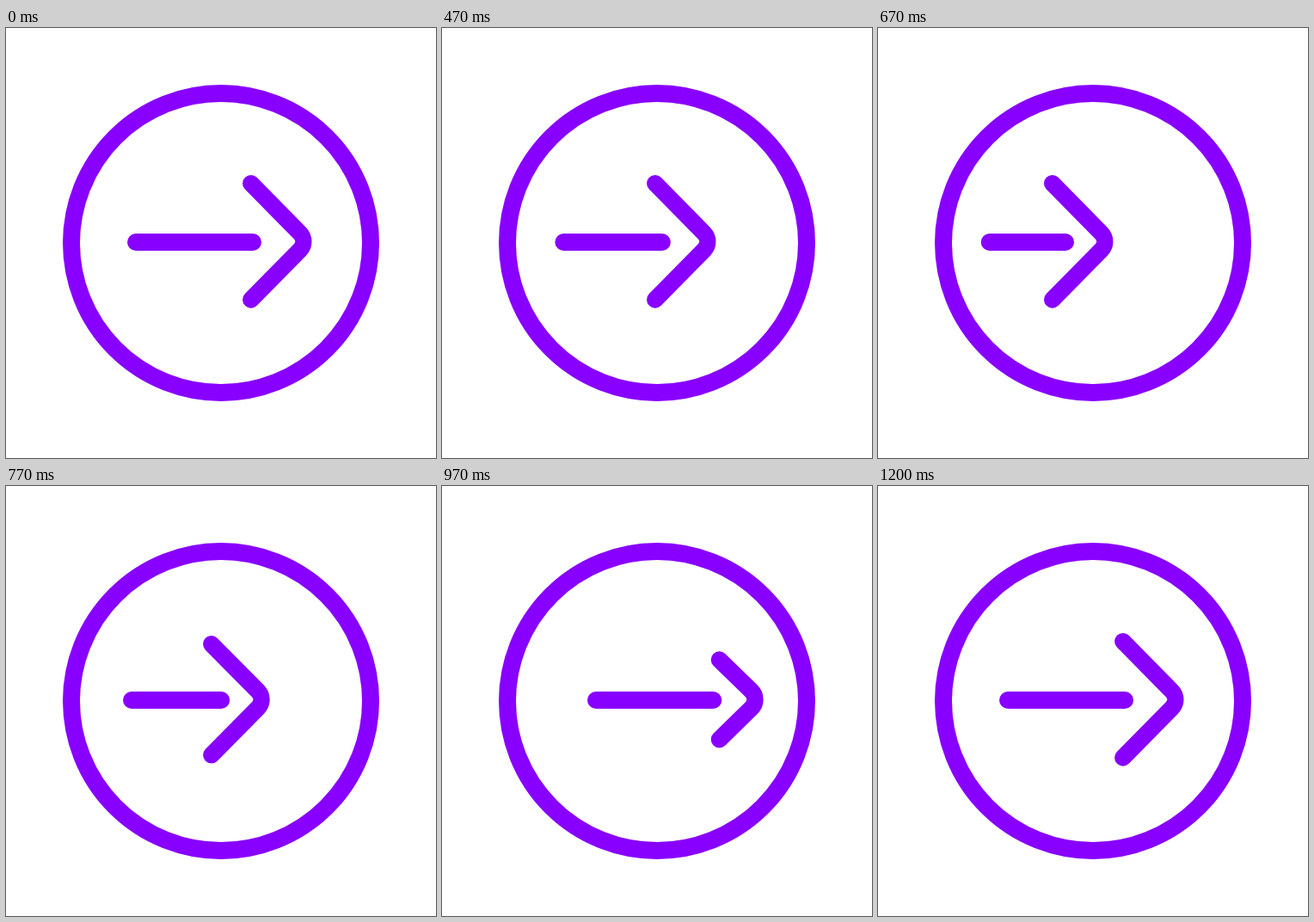
These frames come from a looping animation (500x500 px, 1230 ms). An HTML page with a canvas:

```html
<!DOCTYPE html>
<html lang="en">
<head>
<meta charset="utf-8">
<title>Arrow in a circle</title>
<style>
  html, body { margin: 0; width: 100%; height: 100%; overflow: hidden; background: #fff; }
  canvas { display: block; width: 500px; height: 500px; }
</style>
</head>
<body>
<canvas id="stage" width="500" height="500"></canvas>
<script>
const ctx = document.getElementById('stage').getContext('2d');
const COLOR = '#8800ff';
const LOOP = 1230;
const TICK = 100 / 3;
const LAST = 36;

// Cubic easing with flat ends; x1 and x2 set how long it lingers at each end.
function ease(t, x1, x2) {
  if (t <= 0) return 0;
  if (t >= 1) return 1;
  let lo = 0, hi = 1;
  for (let i = 0; i < 30; i++) {
    const s = (lo + hi) / 2, r = 1 - s;
    const x = 3 * x1 * s * r * r + 3 * x2 * s * s * r + s * s * s;
    if (x < t) lo = s; else hi = s;
  }
  return lo * lo * (3 - 2 * lo);
}

const span = (tick, from, to, x1, x2) => ease((tick - from) / (to - from), x1, x2);

function draw(tick) {
  const back = span(tick, 10, 20, 0.6, 0.17);
  const shoot = span(tick, 20, 28.2, 0.6, 0.17);
  const settle = span(tick, 29, LAST, 0.6, 0.3);
  const shrink = span(tick, 20, 29.5, 0.6, 0.4) * (1 - settle);

  // Rest, pulled back, overshoot, rest.
  const move = (rest, left, right) =>
    rest + (left - rest) * back + (right - left) * shoot + (rest - right) * settle;
  const mix = (a, b) => a + (b - a) * shrink;

  ctx.fillStyle = '#fff';
  ctx.fillRect(0, 0, 500, 500);
  ctx.strokeStyle = COLOR;
  ctx.lineCap = ctx.lineJoin = 'round';

  ctx.lineWidth = 20;
  ctx.beginPath();
  ctx.arc(250, 250, 174, 0, Math.PI * 2);
  ctx.stroke();

  ctx.beginPath();
  ctx.moveTo(move(151, 129.7, 179), 249);
  ctx.lineTo(move(287, 218, 315.3), 249);
  ctx.stroke();

  const midY = 248.3;
  const corner = move(351.4, 269.3, 370);
  const tail = corner - mix(66.6, 47.5);
  const half = mix(67.6, 46.3);
  ctx.lineWidth = 19.5;
  ctx.beginPath();
  ctx.moveTo(tail, midY - half);
  ctx.arcTo(corner, midY, tail, midY + half, 14);
  ctx.lineTo(tail, midY + half);
  ctx.stroke();
}

const start = performance.now();

function frame() {
  const time = (performance.now() - start) % LOOP;
  draw(Math.min(LAST, Math.floor((time + 4) / TICK)));
  requestAnimationFrame(frame);
}
frame();
</script>
</body>
</html>
```
